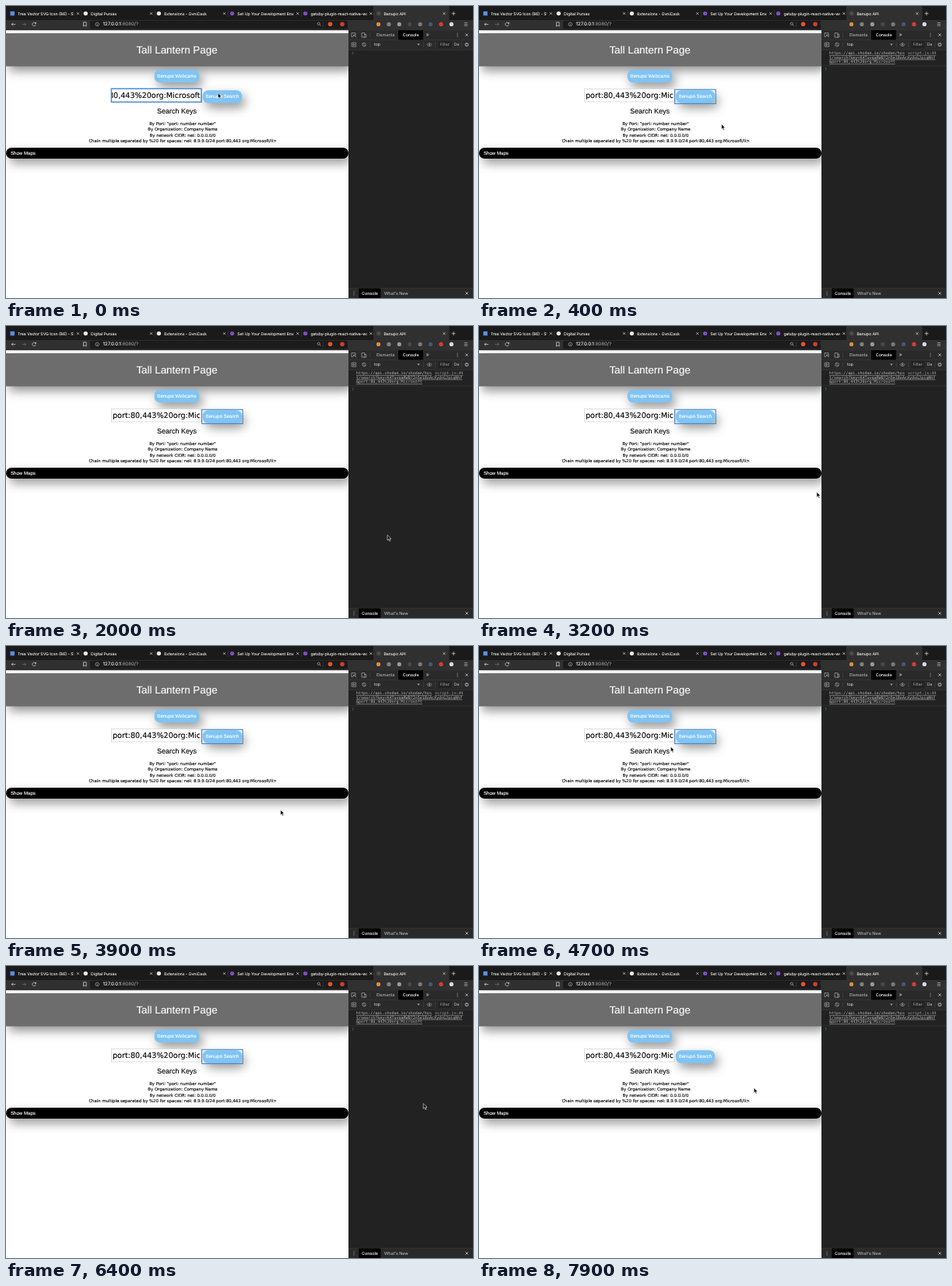
An HTML page that plays this animation: 600x375 px, repeating every 8000 ms.

```html
<!DOCTYPE html>
<html lang="en">
<head>
<meta charset="utf-8">
<title>Search page</title>
<style>
html, body { margin: 0; width: 100%; height: 100%; overflow: hidden; background: #fff; }
svg { display: block; width: 100vw; height: 100vh; }
text { white-space: pre; text-rendering: geometricPrecision; stroke-width: .12; }
.ui { font-family: Inter, Roboto, sans-serif; }
.page { font-family: "Liberation Sans", Arial, sans-serif; }
.wide { font-family: "DejaVu Sans", Verdana, sans-serif; }
.mono { font-family: "DejaVu Sans Mono", monospace; stroke: none; }
.raised { filter: drop-shadow(4.2px 6.2px 6.2px rgba(0,0,0,.42)); }
.line { fill: none; stroke: #aaa; stroke-width: .7; }
.bright { stroke: #ddd; }
</style>
</head>
<body>
<svg id="stage" viewBox="0 0 600 375" preserveAspectRatio="none"></svg>
<script>
const LOOP = 8000, STEP = 100;
const SUBMIT = 300, BLUR = 7800;
const PAGE_W = 440;

const rect = (x, y, w, h, fill, extra = '') =>
  `<rect x="${x}" y="${y}" width="${w}" height="${h}" fill="${fill}" ${extra}/>`;
const dot = (x, y, r, fill) => `<circle cx="${x}" cy="${y}" r="${r}" fill="${fill}"/>`;
const ring = (x, y, r) => `<circle class="line" cx="${x}" cy="${y}" r="${r}"/>`;
const path = (d, tone = '', extra = '') => `<path class="line ${tone}" d="${d}" ${extra}/>`;
const text = (x, y, size, fill, str, font = 'ui', extra = '') =>
  `<text class="${font}" x="${x}" y="${y}" font-size="${size}" fill="${fill}" stroke="${fill}" ${extra}>${str}</text>`;
const centred = 'text-anchor="middle"';
const cross = (x, y, r = 1.7) =>
  path(`M${x - r} ${y - r}l${2 * r} ${2 * r}m0 ${-2 * r}l${-2 * r} ${2 * r}`, 'bright');
const more = (x, y) => [-2, 0, 2].map(d => dot(x, y + d, .55, '#aaa')).join('');
const divider = (x, y, h) => rect(x, y, .5, h, '#484848');

function button(x, y, w, label) {
  return rect(x, y, w, 16.5, '#7fc4f3', 'rx="7" class="raised"') +
    text(x + w / 2, y + 9.9, 6.2, '#fff', label, 'page', centred);
}

function webPage() {
  const tips = [
    'By Port: "port: number number"',
    'By Organization: Company Name',
    'By network CIDR: net: 0.0.0.0/0',
    'Chain multiple separated by %20 for spaces: net: 8.9.9.0/24 port:80,443 org:Microsoft/li&gt;'
  ];
  return rect(0, 0, 600, 375, '#fff') +
    rect(0, 35, PAGE_W, 42.5, '#6d6d6d', 'class="raised"') +
    text(219.5, 61, 13.4, '#fff', 'Tall Lantern Page', 'page', centred) +
    button(190.7, 81.8, 57.6, 'Benupo Webcams') +
    rect(135.5, 106.5, 115.5, 16.5, '#fff', 'stroke="#d2d2d2" stroke-width=".7"') +
    '<g clip-path="url(#field)">' +
    text(137, 118.3, 9.6, '#000', 'port:80,443%20org:Microsoft', 'wide', 'id="query"') + '</g>' +
    rect(135.4, 106.2, 115.6, 17.2, 'none', 'id="fieldRing" stroke="#4f8fd6" stroke-width="1.5"') +
    button(252.7, 108.2, 50.3, 'Benupo Search') +
    rect(251.6, 107.3, 52.6, 18.1, 'none', 'id="buttonRing" stroke="#4b86c6" stroke-width="1.1"') +
    text(219.5, 138, 9, '#000', 'Search Keys', 'page', centred) +
    tips.map((tip, i) => text(227, 152.5 + i * 7.55, 5.37, '#000', tip, 'wide', centred)).join('') +
    rect(0, 182, PAGE_W, 14, '#000', 'rx="7" class="raised"') +
    text(6, 191, 6.1, '#fff', 'Show Maps', 'page');
}

function browserBar() {
  const tabs = [
    ['Tree Vector SVG Icon (86) - SV', '#5b8def'],
    ['Digital Purses', '#e8e8e8'],
    ['Extensions - OvniCask', '#e8e8e8'],
    ['Set Up Your Development Envir', '#7a4fc0'],
    ['gatsby-plugin-react-native-web', '#7a4fc0'],
    ['Benupo API', '#4c4c4c']
  ];
  let out = rect(0, 0, 600, 18, '#1a1a1a') + rect(472, 0, 97.5, 18, '#303030') +
    rect(0, 18, 600, 13.2, '#303030') + rect(108, 18.8, 331, 10.6, '#1c1c1c', 'rx="1.5"');
  tabs.forEach(([label, color], i) => {
    const x = 8.2 + i * 94.1;
    out += `<clipPath id="tab${i}">${rect(x, 0, 79, 18, '#000')}</clipPath>` +
      (i ? dot(x, 9.6, 2.7, color) : rect(x - 2.7, 6.9, 5.4, 5.4, color)) +
      `<g clip-path="url(#tab${i})">${text(x + 6.8, 11.7, 5.1, '#e8e8e8', label)}</g>` +
      cross(x + 84.2, 9.7, 1.5);
    if (i < 4) out += divider(x + 88.5, 5, 9);
  });
  out += path('M575 7.2v5m-2.5-2.5h5', 'bright') +
    path('M12.2 23.5h-5m2-2l-2 2l2 2', 'bright') +
    path('M20.5 23.5h5m-2-2l2 2l-2 2', '', 'opacity=".5"') +
    path('M38.2 22.3a2.3 2.3 0 1 0 .1 2M38.5 20.8v1.8h-1.8', 'bright') +
    path('M99.5 20.8h3.6v5.4l-1.8-1.4l-1.8 1.4z', 'bright') +
    ring(117.3, 23.5, 2.3) + path('M117.3 22.8v2') +
    text(124.6, 25.3, 6.1, '#f2f2f2', '127.0.0.1<tspan fill="#999" stroke="#999">:8080/?</tspan>') +
    ring(401.7, 22.8, 1.6) + path('M403 24l1.6 1.6') + divider(407.5, 20, 7) +
    dot(416.5, 23.2, 2.8, '#e8532c') + dot(432, 23.2, 2.8, '#d43b32');
  const badges = ['#e08a3c', '#808080', '#999', '#484848', '#7a7a7a', '#44557c', '#d8402f', '#ddd'];
  badges.forEach((color, i) => { out += dot(478.5 + i * 13.4, 23.4, 2.6, color); });
  return out + [-1.8, 0, 1.8].map(d => rect(588.7, 23.1 + d, 4.4, .6, '#ccc')).join('');
}

function devTools() {
  const log = [
    'https://api.shodan.io/shodan/hos',
    't/search?key=K4TuvqaRWB72n5e18oAcXydsGJpiqNhf',
    '&amp;port:80,443%20org:Microsoft'
  ];
  const linked = 'text-decoration="underline"';
  const width = 600 - PAGE_W;
  const rule = y => rect(PAGE_W, y, width, .5, '#3c3c3c');
  return rect(PAGE_W, 31.2, width, 344, '#222') +
    rect(PAGE_W, 31.2, width, 25.2, '#2a2a2a') + rule(43.4) + rule(56.2) +
    rect(504, 31.2, 32, 12.2, '#000') +
    path('M444 34.6h5v4.5M444 34.6v5h2M446.5 37l3.2 3.2M446.5 39v-2h2') +
    path('M457 34.7h4v5.4h-4zM460 36.5h2.8v3.6h-2.8') + divider(467.5, 34, 7) +
    text(476, 38.8, 5.4, '#aaa', 'Elements') + text(509.7, 38.8, 5.4, '#fff', 'Console') +
    text(539.6, 39, 7, '#aaa', '»') + more(580, 37.1) + cross(592, 37.1) +
    path('M444.2 47.1h5.4v5h-5.4zM446 48.3l2.2 1.3l-2.2 1.3z') +
    ring(460, 49.6, 2.3) + path('M458.4 48l3.2 3.2') + divider(467.5, 46.2, 7) +
    text(473, 51.3, 5.2, '#c2c2c2', 'top') +
    '<path d="M528.4 48.6h3.2l-1.6 2.2z" fill="#aaa"/>' + divider(536.5, 46.2, 7) +
    path('M541 49.6q3-4 6 0q-3 4-6 0') + dot(544, 49.6, .9, '#aaa') + divider(551.5, 46.2, 7) +
    rect(555.5, 45.3, 17, 8.8, '#222') +
    text(557.5, 51.3, 5.1, '#8c8c8c', 'Filter') + text(575.5, 51.3, 5.1, '#aaa', 'De') +
    divider(585.5, 46.2, 7) + ring(592, 49.6, 1.4) + ring(592, 49.6, 2.2) +
    '<g id="log">' +
    log.map((row, i) => text(450, 62.1 + i * 5.6, 5.04, '#bbb', row, 'mono', linked)).join('') +
    text(587.3, 62.1, 5.04, '#a5a5a5', 'script.js:44', 'mono', linked + ' text-anchor="end"') +
    rule(76.6) + '</g>' +
    path('M444.8 58.8l1.7 1.6l-1.7 1.6', '', 'id="prompt" style="stroke:#4a7fd4"') +
    rect(PAGE_W, 362.4, width, 12.6, '#2a2a2a') + rule(362.2) +
    more(447, 369) + rect(453.3, 362.6, 28, 12.4, '#000') +
    text(457, 370.9, 5.4, '#fff', 'Console') + text(486, 370.9, 5.4, '#aaa', "What's New") +
    cross(592, 369);
}

document.getElementById('stage').innerHTML =
  `<clipPath id="field">${rect(136, 107, 113.6, 16, '#000')}</clipPath>` +
  webPage() + browserBar() + devTools() +
  '<path id="cursor" d="M0 0v6.6l1.5-1.4l1.1 2.5l1.2-.5l-1.1-2.5h2.1z" fill="#000" stroke="#fff" stroke-width=".6"/>';

const el = id => document.getElementById(id);
const show = (id, on) => { el(id).style.display = on ? '' : 'none'; };

// Pointer stops: time, x, y
const stops = [
  [0, 272.3, 111.8], [200, 272.3, 111.8], [900, 470, 313], [1200, 504.4, 330.8],
  [1400, 504.4, 330.8], [1800, 490, 268.5], [2000, 490, 268.5], [2700, 474, 247],
  [3200, 433.9, 213.3], [3600, 390, 239], [4500, 246.3, 129.3], [5100, 246.3, 129.3],
  [6200, 536.2, 176.6], [7200, 536.2, 176.6], [7700, 353.2, 156.5], [LOOP, 353.2, 156.5]
];

function pointerAt(t) {
  const i = stops.findIndex(s => s[0] > t);
  const [t0, x0, y0] = stops[i - 1], [t1, x1, y1] = stops[i];
  const u = (t - t0) / (t1 - t0), e = u * u * (3 - 2 * u);
  return [x0 + (x1 - x0) * e, y0 + (y1 - y0) * e];
}

const queryWidth = el('query').getComputedTextLength();

function render(t) {
  const sent = t >= SUBMIT;
  show('fieldRing', !sent);
  show('buttonRing', sent && t < BLUR);
  show('log', sent);
  el('query').setAttribute('x', sent ? 137 : 249.5 - queryWidth);
  el('prompt').setAttribute('transform', `translate(0 ${sent ? 20.5 : 0})`);
  el('cursor').setAttribute('transform', `translate(${pointerAt(t)})`);
}

const start = performance.now();
function tick() {
  const t = (performance.now() - start) % LOOP;
  render(Math.floor(t / STEP) * STEP);
  requestAnimationFrame(tick);
}
tick();
</script>
</body>
</html>
```
